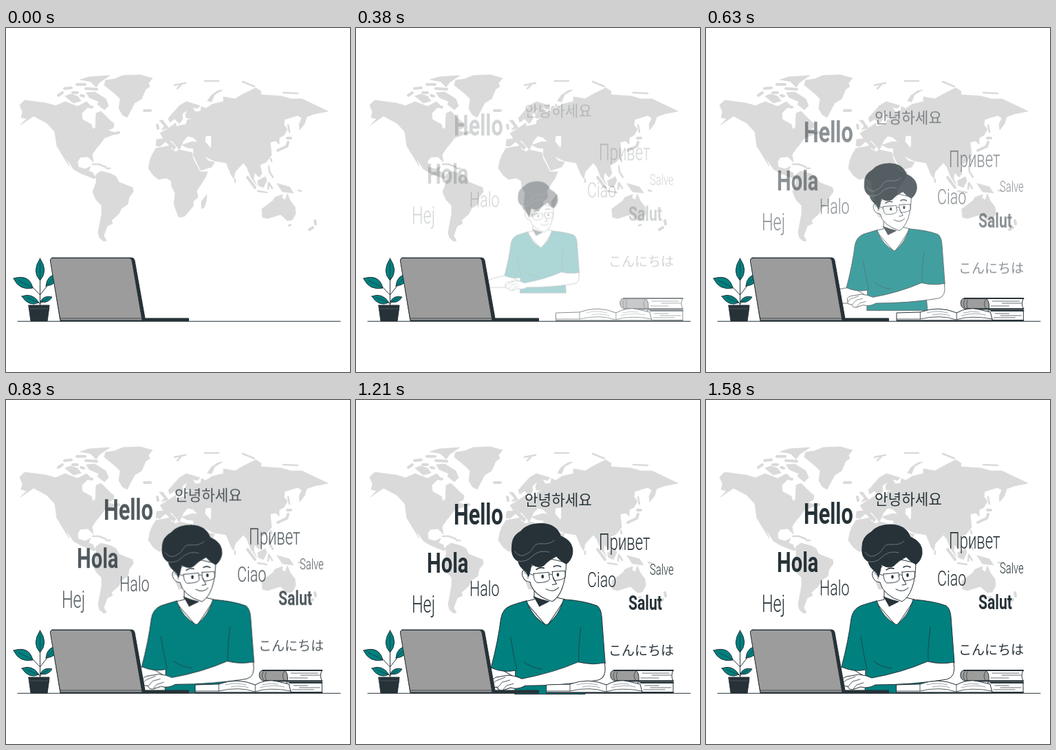
Animation, 500 px wide and 500 px high, one loop 1620 ms. Source, as an HTML page:

```html
<!DOCTYPE html>
<html lang="en">
<head>
<meta charset="utf-8">
<title>Greetings around the world</title>
<style>
  html, body { margin: 0; width: 100%; height: 100%; overflow: hidden; background: #fff; }
  svg { display: block; width: 100%; height: 100%; }
  .ink { fill: none; stroke: #263238; stroke-linecap: round; stroke-linejoin: round; }
  .ink .solid { fill: #263238; }
  .ink .teal { fill: #00807f; }
  .ink .skin { fill: #fff; }
  .ink .grey { fill: #9c9c9c; }
  #map { fill: #dadada; stroke: #dadada; stroke-width: .8; stroke-linejoin: round; stroke-linecap: round; }
  #map .isles { fill: none; }
  #words { font-family: Roboto, sans-serif; font-weight: 300; fill: #263238; }
  #words .bold { font-weight: 700; }
  #words .cjk { font-family: "Noto Sans CJK KR", "Noto Sans CJK JP", "Noto Sans CJK", sans-serif; }
</style>
</head>
<body>
<svg viewBox="0 0 500 500">
  <g id="map">
    <!-- North America, north and south -->
    <path d="M20 112 27 105 58 109 72 113 86 107 104 114 117 107 122 112 110 124 111 133 124 140 126 147 130 145 131 124 138 121 150 133 157 139 156 145 148 149 161 153 143 160 134 172H74L71 151 59 138 40 128 21 141 30 132 22 130 24 122Z"/>
    <path d="M74 171H134L125 184 127 195 119 187 108 188 104 194 105 202 115 205 123 201 120 208 126 210 129 216 137 212 128 219 108 211 98 205 87 188 84 181 92 201 79 180Z"/>
    <!-- Arctic -->
    <path d="M86 99 94 96 104 99 109 106 98 109ZM108 75 121 71 151 69 136 79 131 86 123 78ZM117 94 129 93 145 103 149 113 143 119 133 111 135 107 121 101Z"/>
    <path class="isles" stroke-width="4" d="M76 98 82 94M85 88 95 87M97 94 104 94M103 82 115 82M116 88 132 89M109 98 113 99M119 114 125 115M159 153 164 152M201 120 210 120"/>
    <path d="M145 76 158 74 170 69 195 68 213 73 207 80 209 85 203 89 197 103 187 109 176 130 169 126 164 117 166 103 160 97 143 83Z"/>
    <!-- South America -->
    <path d="M131 213 138 208 153 212 160 216 164 224 184 232 185 238 179 246 177 256 168 262 164 270 153 280 155 284 147 288 142 302 146 309 142 310 136 305 134 297 139 270 139 258 131 250 126 238 131 225Z"/>
    <!-- Africa -->
    <path d="M218 175 239 171 240 176 247 180 252 177 270 181 272 190 282 209 293 209 290 217 277 237 279 246 272 252 272 259 259 274 251 275 244 256 246 240 241 231 240 222 233 218 222 220 214 214 207 204 209 193 212 185ZM284 262 284 252 292 242 291 252 288 261Z"/>
    <!-- Europe -->
    <path d="M218 171 219 162 229 161 224 153 237 145 247 138 247 143 262 140 263 134 271 131 262 131 261 126 264 119 256 125 257 132 252 139 245 132 238 137 236 131 252 113 262 107 282 113 278 117 271 115 275 122 283 121 284 114 290 117 300 111V156L290 157 289 165 296 173 291 177 263 174 256 170 271 165 279 166 272 159 264 157 258 164 252 177 241 164 237 163 247 173 244 177 232 165 224 172Z"/>
    <!-- Asia, north and south -->
    <path d="M299 111 316 107 316 100 333 103 343 97 363 87 371 92 370 97 400 99 414 103 430 103 468 121 448 125 437 129 434 139 427 148 426 140 430 131 424 127 405 133 404 141 409 147 404 156 396 160H299Z"/>
    <path d="M299 156 397 159 397 169 392 164 384 166 386 185 378 195 369 199 372 211 368 217 361 210 360 219 364 228 356 217 350 202 345 196 333 209 331 219 327 213 320 196 302 193 288 186 294 193 303 195 299 202 283 207 272 184 273 172 284 167 291 177 298 173Z"/>
    <!-- Small islands -->
    <path d="M293 106 298 98 308 91 315 90 303 97 299 107ZM223 134 228 134 236 145 226 148 230 143ZM366 222 377 216 379 222 374 232 367 229ZM394 226 412 231 418 240 402 238Z"/>
    <path class="isles" stroke-width="2.5" d="M245 83 261 80M249 88 254 83M289 77 309 77M344 78 361 85M403 94 424 95M126 198 135 198 145 202M146 204 151 204M410 141 412 151M382 201 383 209 388 217M366 237 379 239M381 234 382 225 387 233M333 220V224M425 236 429 237M385 190 386 194M411 287 414 286"/>
    <path class="isles" stroke-width="4" d="M220 141 221 146M409 160 414 160M410 166 408 172 395 178M351 217 362 232M449 280 450 285M446 290 441 293"/>
    <!-- Australia -->
    <path d="M372 263 388 251 391 246 402 242 401 247 406 250 409 241 413 251 420 260 421 270 416 279 409 280 399 271 380 277 373 275Z"/>
  </g>

  <g id="words"></g>

  <path class="ink" d="M17 426.3H486"/>

  <g id="woman" class="ink">
    <!-- far hand -->
    <path class="skin" d="M160 398Q187 389 200 388L214 392 228 400 225 414H165Z"/>
    <!-- neck and chest -->
    <path class="skin" d="M259 268V290L246 293 277 329 303 290 286 286Z"/>
    <path class="solid" d="M258 286Q270 291 280 293 272 297 266 300 259 296Z"/>
    <!-- shirt -->
    <path class="teal" d="M248 292Q256 316 277 327 295 313 301 290 330 292 349 299 355 303 356 315L361 382Q348 386 328 381L332 426H231L232 392Q215 396 197 388 207 350 211 318 213 304 225 299 237 295 248 292Z"/>
    <path d="M225 344Q229 370 234 391M326 330Q322 360 323 381M244 380Q256 389 270 390" stroke-width=".7"/>
    <!-- near arm -->
    <path class="skin" d="M360 381Q364 403 350 406 300 414 246 414 236 420 225 417L213 421Q207 421 206 416 198 417 199 410 196 405 204 402L222 399Q233 400 241 404 285 396 322 380 342 385 360 381Z"/>
    <path d="M224 406 213 409 207 416M229 411 219 414 214 420M217 402 204 407 199 411" stroke-width=".8"/>
    <!-- face -->
    <path class="skin" d="M249 248Q240 246 242 256 245 265 253 265 257 284 285 293 304 281 305 237L270 229Z"/>
    <path d="M245 252Q251 254 250 260" stroke-width=".7"/>
    <path class="solid" d="M247 250Q237 243 236 235 225 229 227 213 227 199 240 192 249 181 270 181 291 182 297 199 316 207 314 224 312 234 305 239 296 234 291 228 279 234 273 241 265 246 255 239 254 247 251 257Z"/>
    <path d="M231 221Q239 232 249 224C260 219 255 209 270 210Q282 211 288 205M236 235Q248 237 256 228 267 218 280 222" stroke="#89949a" stroke-width=".7"/>
    <!-- glasses and features -->
    <path d="M245 250 257 255M258 253 280 251 281 261Q279 266 263 266 258 263 258 253ZM285 250 303 249 304 257Q302 262 288 263 285 260 285 250ZM280 255Q282 252 285 255" stroke-width=".9"/>
    <path d="M262 247Q267 243 273 245M287 243Q292 240 297 243" stroke-width="1.6"/>
    <g fill="#263238" stroke="none">
      <ellipse cx="271" cy="257" rx="1.8" ry="2.7"/>
      <ellipse cx="293" cy="254.5" rx="1.8" ry="2.7"/>
    </g>
    <path d="M286 258 291 268 285 269M276 275Q286 281 294 273"/>
  </g>

  <g class="ink">
    <!-- plant -->
    <path d="M49.5 364V403M38 376 49.5 388 62 372M46 398 49.5 401 54 397"/>
    <path class="teal" d="M49.5 335Q37 354 49.5 367 62 353 49.5 335ZM11 364Q34 357 39 378 19 382 11 364ZM58 375Q59 359 76 357 75 374 58 375ZM23 390Q38 384 48 399 33 406 23 390ZM50 398Q54 388 67 391 61 401 50 398Z"/>
    <path d="M49.5 342V366M18 367 38 377M60 373 71 362M30 392 47 399M51 398 61 393" stroke-width=".7"/>
    <path class="solid" d="M33 403H63L62.5 408 60 426H36L33.5 408Z"/>
    <path d="M35 408H61" stroke="#7d878b" stroke-width=".4"/>
    <!-- laptop -->
    <path class="solid" d="M68 334H183Q186 334 187 338L202 422H265.5V426H79L65 339Q64 334 68 334Z"/>
    <path class="grey" d="M68 334.5H179Q182 334.5 183 338L198 425H79L64.5 339Q64 334.5 68 334.5Z"/>
    <path d="M79 422H198" stroke-width=".8"/>
  </g>

  <g id="books" class="ink">
    <!-- closed books -->
    <path class="skin" d="M410 410H461V425H410Z"/>
    <path class="skin" d="M376 393H461Q457 401 461 408H376Z"/>
    <path class="grey" d="M375 393H405Q412 394 411 408H375Q369 405 370 398 371 393 375 393Z"/>
    <path d="M375 393H461M378 408.5H461M414 411H461M414 425H461" stroke-width="2"/>
    <path d="M376 395Q372 400 376 407M380 395Q377 401 380 407M406 395Q402 401 406 407" stroke-width=".7"/>
    <path d="M416 397H455M430 400H458M414 404H440M420 415H440M428 418H458M418 421H449" stroke-width=".7"/>
    <!-- open book -->
    <path class="skin" d="M277 414 311 413Q338 403 364 414 380 405 396 409L413 413 416 425H277Z"/>
    <path d="M277 423H311Q341 416 363 424 385 417 416 423M311 413V423M364 414V424" stroke-width=".8"/>
    <path d="M321 414Q335 410 351 414M329 417Q342 414 354 418M374 414Q385 411 397 413M371 418Q390 413 406 417" stroke="#899297" stroke-width=".8"/>
    <path d="M277 425.5H416" stroke-width="1.6"/>
  </g>
</svg>
<script>
const LOOP = 1620, FRAME = 1000 / 24, UNIT = 1250;
const $ = id => document.getElementById(id);

// text, x, baseline, size, style
const words = [
  ["Hello", 142, 179.5, 42, "bold"],
  ["Hola", 103, 249.5, 40, "bold"],
  ["Salut", 396, 303.5, 29, "bold"],
  ["Halo", 165, 283.5, 32, "light"],
  ["Hej", 81, 307.5, 35, "light"],
  ["Ciao", 336, 270, 32, "light"],
  ["Salve", 427, 252, 22, "light"],
  ["Привет", 353, 216, 33, "light"],
  ["안녕하세요", 245, 151.5, 21.3, "cjk"],
  ["こんにちは", 367, 369.5, 19, "cjk"],
];
const condense = { bold: .73, light: .67, cjk: 1 };

$("words").innerHTML = words.map(([text, x, y, size, style]) =>
  `<text class="${style}" font-size="${size}" transform="translate(${x} ${y}) scale(${condense[style]} 1)">${text}</text>`
).join("");

const bezier = (a, b, s) => 3 * (1 - s) ** 2 * s * a + 3 * (1 - s) * s * s * b + s ** 3;

// cubic-bezier(.36, -.01, .5, 1.38)
function ease(x) {
  if (x >= 1) return 1;
  let low = 0, high = 1;
  for (let i = 0; i < 24; i++) {
    const mid = (low + high) / 2;
    if (bezier(.36, .5, mid) < x) low = mid; else high = mid;
  }
  return bezier(-.01, 1.38, low);
}

function enter(id, time, duration, transform) {
  const p = ease(time / duration);
  $(id).setAttribute("transform", transform(p));
  $(id).setAttribute("opacity", Math.min(1, Math.max(0, p)));
}

function draw() {
  const step = Math.floor((performance.now() % LOOP + 4) / FRAME);
  const time = step < 3 ? 0 : step * FRAME;
  enter("books", time, UNIT * .75, p => `translate(${30 * (1 - p)} 0)`);
  enter("woman", time, UNIT, p => `translate(253 305) scale(${.5 + .5 * p}) translate(-253 -305)`);
  enter("words", time, UNIT * 1.25, p => `translate(0 ${-30 * (1 - p)})`);
  requestAnimationFrame(draw);
}
draw();
</script>
</body>
</html>
```
